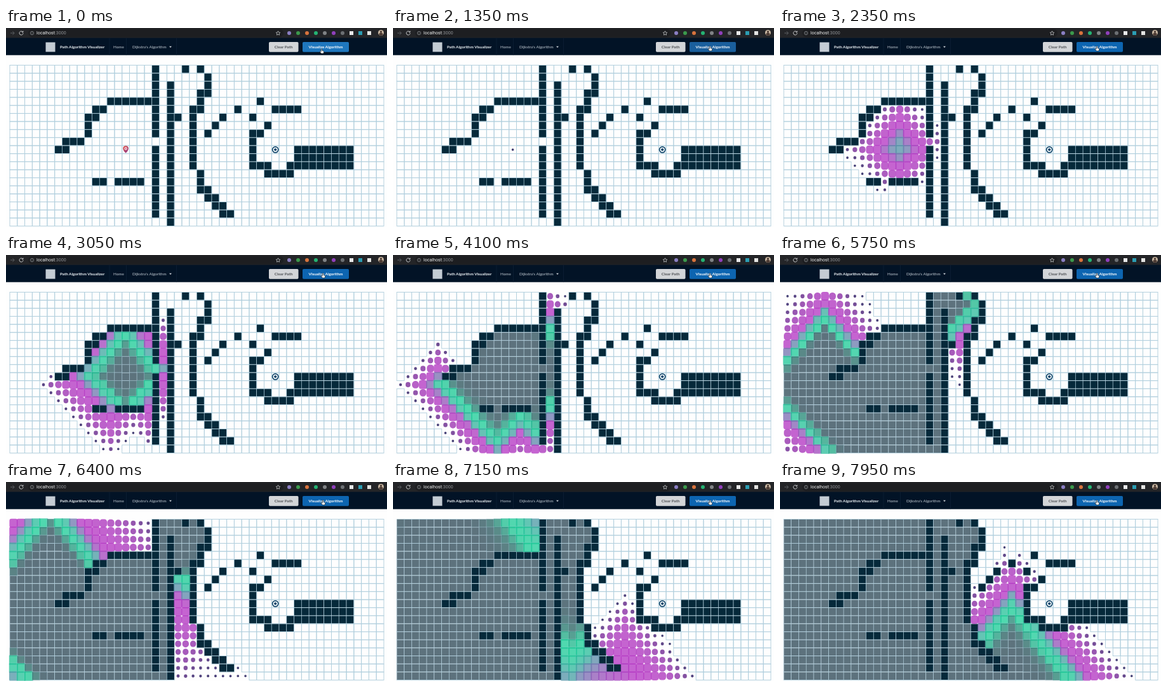
Recreate the animation shown at these times as an HTML page with a canvas. Size 600 px wide and 313 px high, loop 8 s.

```html
<!DOCTYPE html>
<html lang="en">
<head>
<meta charset="utf-8">
<title>Path Algorithm Visualizer</title>
<style>
  html, body { margin: 0; width: 100%; height: 100%; overflow: hidden; background: #fefefe; }
  canvas, svg { position: absolute; left: 0; top: 0; display: block; }
  text { font-family: Lato, sans-serif; font-size: 6.28px; fill: #c3cad2; }
  .bold { font-weight: 700; }
  .url { font-family: Roboto, sans-serif; font-size: 7.1px; fill: #eceded; }
</style>
</head>
<body>
<canvas id="board" width="600" height="313"></canvas>
<svg width="600" height="313" viewBox="0 0 600 313">
  <rect width="600" height="16" fill="#242528"/>
  <rect x="35" y="1.5" width="402" height="13" rx="6.5" fill="#1d1e21"/>
  <g fill="none" stroke="#85888c" stroke-width="1">
    <path d="M7 8h6M10.5 5.3 13.2 8l-2.7 2.7" stroke="#5d6064"/>
    <path d="M26.4 6.2A3 3 0 1 0 27 8M27 4.6v2h-2" stroke="#c6c8ca"/>
    <circle cx="41" cy="8" r="2.7" stroke-width=".8"/>
    <path d="M41 7.6v1.8M41 6.2v.7" stroke-width=".8"/>
  </g>
  <text class="url" x="48" y="10.4">localhost<tspan fill="#8f9296">:3000</tspan></text>
  <path d="M428.500 4.800l1 2.100 2.300.3-1.700 1.600.4 2.300-2-1.100-2 1.100.4-2.300-1.700-1.600 2.300-.3z" fill="none" stroke="#c6c8ca" stroke-width=".8"/>
  <g id="extensions"></g>
  <g>
    <circle cx="590.500" cy="7.500" r="4.500" fill="#c9b7a2"/>
    <circle cx="590.500" cy="6" r="1.700" fill="#4b3a33"/>
    <path d="M587.300 10.600a3.200 3 0 0 1 6.400 0 4.500 4.500 0 0 1-6.400 0z" fill="#4b3a33"/>
  </g>

  <rect y="15.500" width="600" height="27.200" fill="#021326"/>
  <path d="M163 16v26.500M189.500 16v26.500M268.500 16v26.500" stroke="#0f2136" stroke-width=".8"/>
  <rect x="62.500" y="22.500" width="15" height="15" fill="#c4ccd4"/>
  <text class="bold" x="85" y="32" fill="#fff" style="fill:#eef1f4">Path Algorithm Visualizer</text>
  <text x="169" y="32">Home</text>
  <text x="199" y="32">Dijkstra's Algorithm</text>
  <path d="M257 28.700h4l-2 2.300z" fill="#d5dae0"/>
  <rect x="414" y="22" width="46.500" height="15.700" rx="1.800" fill="#d3d5d8"/>
  <text class="bold" x="437.200" y="32" text-anchor="middle" style="fill:#505357">Clear Path</text>
  <rect id="button" x="467" y="22" width="73" height="15.700" rx="1.800"/>
  <text class="bold" x="503.500" y="32" text-anchor="middle" style="fill:#fff">Visualize Algorithm</text>
  <path id="cursor" d="M-.8-3.500q.8-.8 1.500 0v2.600l2.300.6q.7.3.6 1.100l-.6 2.700h-3.600l-2.200-2.900q.1-.9 1.100-.5l.9.7z"
        fill="#fff" stroke="#1b1b1b" stroke-width=".6"/>
</svg>
<script>
const LOOP = 8000, COLS = 50, ROWS = 20;
const LEFT = 6, TOP = 58.5, W = 11.78, H = 12.65;
const START = { c: 15, r: 10 }, GOAL = { c: 35, r: 10 };
const LINE = '#b3d0de', WALL = '#06293a', VISITED = '#5d727d';
const STEP = 10, DURATION = 1500; // ms per searched cell, ms per cell animation

// Wall blocks: column, row, width, height (sizes default to 1)
const WALLS = `19 0 1 9,19 10 1 9,21 2 1 18,24 5 1 8,23 0,25 0,26 1 1 3,25 3 1 3,22 6,
  13 4 6,11 5 2,10 6 2,10 7 1 2,7 9 3,6 10 2,11 14 2,14 14 4,25 13 1 3,26 15 1 2,27 16 1 2,
  28 17 1 2,29 18,33 4,30 5,35 5 4,28 6,32 6,27 7,34 7,26 8,32 8 2,32 9 1 4,33 12 2,
  34 13 4,37 12,38 10 8 3`;

const walls = new Set();
for (const block of WALLS.split(',')) {
  const [c, r, w = 1, h = 1] = block.trim().split(' ').map(Number);
  for (let y = r; y < r + h; y++) for (let x = c; x < c + w; x++) walls.add(y * COLS + x);
}

// Breadth-first search order: cell -> index of its visit
function search() {
  const order = new Map([[START.r * COLS + START.c, 0]]);
  for (const cell of order.keys()) {
    const c = cell % COLS, r = (cell - c) / COLS;
    for (const [dc, dr] of [[0, -1], [-1, 0], [1, 0], [0, 1]]) {
      const x = c + dc, y = r + dr, next = y * COLS + x;
      if (x < 0 || y < 0 || x >= COLS || y >= ROWS) continue;
      if (!walls.has(next) && !order.has(next)) order.set(next, order.size);
    }
  }
  return order;
}
const visitOrder = search();

// Recorded pace of the search: [time, cells visited]
const PACE = [[1345, 0], [3050, 150], [4100, 222], [5150, 320], [6400, 446], [7950, 602]];
function visitedAt(t) {
  let i = 1;
  while (i < PACE.length - 1 && t > PACE[i][0]) i++;
  const [t0, n0] = PACE[i - 1], [t1, n1] = PACE[i];
  return n0 + (t - t0) / (t1 - t0) * (n1 - n0);
}

const lerp = (a, b, k) => a + (b - a) * k;
const clamp = x => Math.max(0, Math.min(1, x));

// CSS "ease": cubic-bezier(.25, .1, .25, 1)
function ease(x) {
  let lo = 0, hi = 1;
  for (let i = 0; i < 14; i++) {
    const s = (lo + hi) / 2, q = 1 - s;
    if (.75 * q * q * s + .75 * q * s * s + s * s * s < x) lo = s; else hi = s;
  }
  const s = lo, q = 1 - s;
  return .3 * q * q * s + 3 * q * s * s + s * s * s;
}

const COLORS = [[0, [5, 0, 70]], [.5, [178, 48, 193]], [.75, [22, 203, 148]], [1, [39, 68, 82]]];
function colorAt(p) {
  const i = p < .5 ? 0 : p < .75 ? 1 : 2;
  const [p0, from] = COLORS[i], [p1, to] = COLORS[i + 1];
  const k = ease((p - p0) / (p1 - p0));
  return `rgba(${from.map((v, n) => Math.round(lerp(v, to[n], k)))},.75)`;
}
const scaleAt = p => p < .75 ? lerp(.3, 1.2, ease(p / .75)) : lerp(1.2, 1, ease((p - .75) / .25));

const ctx = document.getElementById('board').getContext('2d');
const center = ({ c, r }) => [LEFT + (c + .5) * W, TOP + (r + .5) * H];

function drawStatic(c, r, fill) {
  const x = LEFT + c * W, y = TOP + r * H;
  ctx.strokeStyle = LINE;
  ctx.strokeRect(x, y, W, H);
  if (!fill) return;
  ctx.fillStyle = fill;
  ctx.fillRect(x + .25, y + .45, W - .5, H - .9);
}

function drawGrowing(c, r, p) {
  const [x, y] = center({ c, r });
  const w = W * scaleAt(p), h = H * scaleAt(p);
  ctx.beginPath();
  ctx.roundRect(x - w / 2, y - h / 2, w, h, Math.min(.5, 1 - ease(p)) * w);
  ctx.fillStyle = colorAt(p);
  ctx.fill();
  ctx.globalAlpha = clamp(p * 2 - 1) * .8;
  ctx.strokeStyle = LINE;
  ctx.stroke();
  ctx.globalAlpha = 1;
}

function disc(x, y, radius, color) {
  ctx.fillStyle = color;
  ctx.beginPath();
  ctx.arc(x, y, radius, 0, 7);
  ctx.fill();
}

function drawPin() {
  const [x, y] = center(START);
  const fill = ctx.createLinearGradient(x - 4, y - 5, x + 4, y + 4);
  fill.addColorStop(0, '#e0524a');
  fill.addColorStop(1, '#8f3a86');
  ctx.fillStyle = fill;
  ctx.beginPath();
  ctx.moveTo(x, y + 5.5);
  ctx.bezierCurveTo(x - 7, y - 1, x - 4.5, y - 6, x, y - 6);
  ctx.bezierCurveTo(x + 4.5, y - 6, x + 7, y - 1, x, y + 5.5);
  ctx.fill();
  disc(x, y - 1.7, 2.3, '#f3dfe4');
  disc(x, y - 1.7, 1.1, '#d8627a');
}

function drawGoal() {
  const [x, y] = center(GOAL);
  disc(x, y, 5.4, '#12486d');
  disc(x, y, 3.7, '#fff');
  disc(x, y, 2.1, '#12486d');
}

function drawBoard(t) {
  const visited = visitedAt(t), growing = [];
  ctx.clearRect(0, 0, 600, 313);
  ctx.lineWidth = .95;
  for (let r = 0; r < ROWS; r++) for (let c = 0; c < COLS; c++) {
    const cell = r * COLS + c;
    const p = (visited - (visitOrder.get(cell) ?? Infinity)) * STEP / DURATION;
    if (walls.has(cell)) drawStatic(c, r, WALL);
    else if (p < 0) drawStatic(c, r);
    else if (p >= 1) drawStatic(c, r, VISITED);
    else growing.push([c, r, p]);
  }
  ctx.lineWidth = .7;
  for (const cell of growing) drawGrowing(...cell);
  if (visited < 0) drawPin();
  drawGoal();
}

const EXTENSIONS = ['#8b7fc4', '#3b9a4c', '#d9733d', '#25b373', '#808386', '#9040bd', '#6c7074', '#e8e9ea', '#2b9db3', '#e4e4e2'];
document.getElementById('extensions').innerHTML = EXTENSIONS.map((color, i) =>
  `<rect x="${443 + i * 14}" y="5" width="6" height="6" rx="${i > 6 ? 0 : 3}" fill="${color}"/>`).join('');

const button = document.getElementById('button'), cursor = document.getElementById('cursor');

function frame(now) {
  const t = now % LOOP;
  const move = ease(clamp((t - 100) / 600));
  cursor.setAttribute('transform', `translate(${lerp(497, 499, move)} ${lerp(36.5, 32.5, move)})`);
  button.setAttribute('fill', t < 1200 ? '#1f77be' : t < 1450 ? '#1a5f9d' : '#0d65b1');
  drawBoard(t);
  requestAnimationFrame(frame);
}
frame(performance.now());
</script>
</body>
</html>
```
